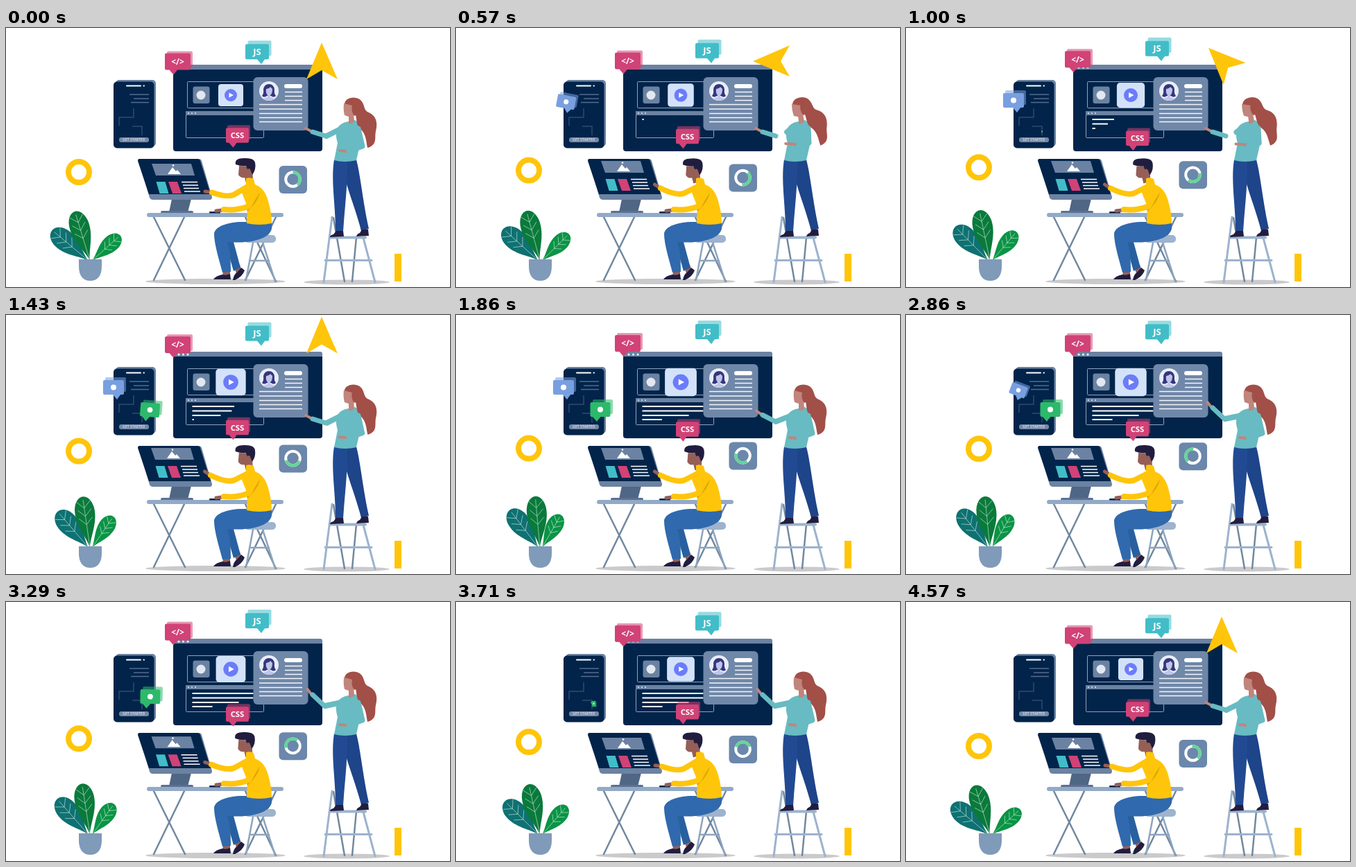
These frames come from a looping animation (640x374 px, 4.64 s). An HTML page:

```html
<!DOCTYPE html>
<html lang="en">
<head>
<meta charset="utf-8">
<title>Design and development</title>
<style>
html,body{margin:0;width:100%;height:100%;overflow:hidden;background:#fff}
svg{display:block;width:100vw;height:100vh}
text{font-family:"Open Sans",sans-serif;font-weight:700;fill:#fff;text-anchor:middle}
.line{fill:none;stroke-linecap:round;stroke-linejoin:round}
.navy{fill:#02244a}.slate{fill:#6b82a2}.teal{fill:#42bdc8}.pink{fill:#d14276}
.sun{fill:#ffc50a}.dark{fill:#211d3f}.brown{fill:#955f57}.skin{fill:#c0857c}
</style>
</head>
<body>
<svg viewBox="0 0 640 374">
  <!-- floor -->
  <ellipse cx="302" cy="366" rx="101" ry="4" fill="#cacacc"/>
  <ellipse cx="491" cy="367" rx="62" ry="3.5" fill="#cacacc"/>
  <rect class="sun" x="560" y="326" width="10" height="40"/>
  <circle id="ring" cx="105" cy="208" r="15" fill="none" stroke="#ffc50a" stroke-width="8"/>

  <!-- large window -->
  <rect class="slate" x="241" y="53" width="215" height="30" rx="3"/>
  <path class="navy" d="M241 60H456V174q0 4-4 4H245q-4 0-4-4Z"/>
  <g fill="#fff"><circle cx="249" cy="57" r="1.5"/><circle cx="255.500" cy="57" r="1.5"/><circle cx="262" cy="57" r="1.5"/></g>
  <g fill="none" stroke="#8fa3bf"><rect x="261.500" y="77.500" width="108" height="38" rx="1"/><rect x="259.500" y="120.500" width="112" height="38" rx="1"/></g>
  <rect class="slate" x="259" y="120" width="113" height="6"/>
  <g fill="#dfe7f2"><circle cx="263" cy="123" r="1"/><circle cx="268" cy="123" r="1"/><circle cx="273" cy="123" r="1"/></g>
  <rect class="slate" x="269.500" y="84.500" width="24" height="24.500" rx="3"/>
  <circle cx="281" cy="97" r="6.500" fill="#e3e8f0"/>
  <g id="play">
    <rect x="-18" y="-16" width="36" height="32" rx="4" fill="#d3e2f8"/>
    <circle r="9" fill="#6b7cfa"/><path d="M-2.500-3.500 4 0-2.500 3.500Z" fill="#fff"/>
  </g>
  <g id="code" class="line" stroke="#fff" stroke-width="2" style="stroke-linecap:butt"></g>
  <rect x="356.500" y="71" width="79" height="77" rx="6" fill="#6f87a8"/>
  <circle cx="379" cy="91" r="14" fill="#e9edf8"/>
  <path d="M369 98q3-4 2-9 1-8 8-8t8 8q-1 5 2 9-3 3-7 0h-6q-4 3-7 0Z" fill="#34377c"/>
  <path d="M375 88q5-1 6-3l3 3q0 7-3 9v3q5 1 6 3-8 4-16 0 1-2 6-3v-3q-3-3-2-9Z" fill="#bfc5e8"/>
  <rect x="401" y="81" width="26" height="6" rx="3" fill="#fff"/>
  <path d="M402 92.500h25M402 98.500h25M402 104.500h25M365 110.500h62M365 117h62M365 123.500h62M365 129.500h62M365 135.500h62" stroke="#f5f7fa" stroke-width="1.600"/>

  <!-- phone -->
  <rect class="slate" x="158" y="75" width="58" height="96" rx="5"/>
  <rect class="navy" x="155" y="77.500" width="58.500" height="96" rx="5"/>
  <path class="line" d="M174 83.500h20M198.500 83.500h.5" stroke="#fff" stroke-width="2"/>
  <path d="M178 96h28M184 102h22M180 107.500h26" stroke="#516b8e" stroke-width="1.600"/>
  <path d="M163 141v-12h21v-13M182 142h14v13" fill="none" stroke="#30496d" stroke-width="1.500"/>
  <rect x="163" y="158" width="43" height="7" rx="3" fill="#7488a6"/>
  <text x="184.500" y="163.300" font-size="4.600" letter-spacing=".3" style="font-weight:600" opacity=".85">GET STARTED</text>

  <!-- progress panel -->
  <g id="panel">
    <rect x="393.500" y="199" width="40.500" height="40" rx="6" fill="#6b87ab"/>
    <circle cx="413.500" cy="218.500" r="10.300" fill="none" stroke="#fff" stroke-width="4"/>
    <circle id="arc" cx="413.500" cy="218.500" r="10.300" fill="none" stroke="#62d695" stroke-width="4" pathLength="360" stroke-dasharray="142 218"/>
  </g>

  <!-- plant -->
  <g id="plant"></g>
  <path d="M105 334h33v10c0 14-6 21-16.500 21S105 358 105 344Z" fill="#809ab9"/>

  <!-- desk and stool -->
  <g class="line" stroke="#71889f" stroke-width="2.500">
    <path d="M213 273 258 364M257 273 213 364M345 273 389 366M389 273 345 364"/>
    <path d="M356 310 346 364M370 310 388 366M351 336h28" stroke="#8da4bf"/>
  </g>
  <rect x="344" y="299" width="45" height="11" rx="5" fill="#9db3ce"/>
  <path d="M239 247h28l-5 19h-27Z" fill="#4f6685"/>
  <rect x="223" y="264" width="47" height="4" rx="2" fill="#5a7193"/>
  <path class="slate" d="M194 189H278q3 0 4 3L297 244q0 4-3 4H212q-4 0-5-3L191 192Z"/>
  <path class="navy" d="M192 189H276q3 0 4 3L295 240H206L190 192q0-3 2-3Z"/>
  <g id="page">
    <path class="slate" d="M210 196h57l5 17H216Z"/>
    <path d="M233 211 240 201 245 207 247 205 252 211Z" fill="#fff"/><circle cx="241" cy="198.500" r="1.300" fill="#fff"/>
    <path class="teal" d="M216.500 222h13l5 17H221.500Z"/><path class="pink" d="M234 222h13l6 17H240Z"/>
    <path d="M253 222.500h23M255 227h22M256 231.500h22M257 236h23" stroke="#fff" stroke-width="1.500"/>
  </g>
  <rect x="203" y="267" width="197" height="6" rx="3" fill="#92aac7"/>
  <rect class="navy" x="293" y="265" width="16" height="2.500" rx="1"/>

  <!-- seated man -->
  <path class="brown" d="M313 350h10v10h-11ZM329 345l8-3 4 12-8 4Z"/>
  <path d="M345 282C326 284 312 296 315 306L328 351 338 346 328 309 365 302Z" fill="#28609f"/>
  <path d="M383 280H345C322 279 301 286 300 297 300 312 307 334 312 353L324 352C324 334 323 320 319 309 340 311 378 309 383 290Z" fill="#3069ad"/>
  <path class="dark" d="M299 363q3-5 13-7 5 2 11-1l1 8ZM327 364q1-8 6-11l6-7 5 4q-3 9-14 14Z"/>
  <g id="manHead">
    <path class="brown" d="M336 199 335 212q3 5 9 4l2 8 10-3-1-21Z"/>
    <path class="dark" d="M331 197q-2-9 12-9 14-1 16 6 2 10-4 18l-3-8q-2-2-4 0l-2-5q-7 1-15-2Z"/>
  </g>
  <path class="sun" d="M346 217q6-2 11 1l2 8q14 5 19 24 5 18 5 32-18 4-36 0l1-24-8-20 6-13Z"/>
  <path d="M366 237Q364 250 348 265L346 260Q358 252 366 237Z" fill="#dba508"/>
  <path class="line" id="manHand" stroke="#955f57" stroke-width="5"/>
  <path class="line" id="manArm" stroke="#ffc50a" stroke-width="8"/>
  <path class="line" d="M303 264 311 263" stroke="#955f57" stroke-width="5"/>
  <path class="line" d="M314 262Q334 264 350 257L360 238" stroke="#ffc50a" stroke-width="8"/>

  <!-- ladder -->
  <g class="line" stroke-width="3">
    <path d="M472 274 488 366M505 302 499 366" stroke="#71889f" stroke-width="2.500"/>
    <path d="M470 273 458 367M515 303 532 367M460 335.500H527" stroke="#9db3ce"/>
    <path d="M467 302.500H518" stroke="#9db3ce" stroke-width="4"/>
  </g>

  <!-- standing woman -->
  <path d="M488 190H505C512 218 514 250 523 290L512 293C504 262 494 238 488 215Z" fill="#1e4489"/>
  <path d="M473 190H492C493 225 488 260 486 294H475C475 255 468 220 473 190Z" fill="#214a92"/>
  <path class="dark" d="M467 302q0-3 5-4l4-5h10l1 8ZM505 301q1-4 5-5l3-5h9l1 9Z"/>
  <path class="line" id="herHand" stroke="#c0857c" stroke-width="4"/>
  <path class="line" id="herFore" stroke="#68bbc2" stroke-width="7"/>
  <path class="line" id="herUpper" stroke="#68bbc2" stroke-width="8"/>
  <path d="M489 136 503 133C512 137 512 152 511 165L505 191Q488 195 473 191L478 166C473 150 477 140 489 136Z" fill="#68bbc2"/>
  <path class="line" id="hipHand" stroke="#c0857c" stroke-width="4"/>
  <g id="herHead">
    <path d="M488 109C490 99 506 98 512 105 518 112 515 119 523 122 534 127 536 137 533 149 531 158 536 169 521 173 519 163 519 153 511 146 503 139 507 129 502 121L499 112Z" fill="#a24f48"/>
    <path class="skin" d="M487 109q-1 10 1 17l6 2v10q5 1 8-3l-1-14 1-9-4-3Z"/>
    <path d="M488 109q7-5 14-1l4 9q-1 10-4 10-5-7-3-15Z" fill="#a24f48"/>
  </g>
  <path class="line" id="hipArm" stroke="#68bbc2" stroke-width="7"/>

  <path id="cursor" class="sun" d="M0-27 23 26 0 13-22 26Z"/>

  <!-- labels -->
  <g id="tag"></g><g id="js"></g><g id="css"></g><g id="blue"></g><g id="green"></g>
</svg>
<script>
const LOOP = 4640, $ = id => document.getElementById(id);
const set = (id, name, value) => $(id).setAttribute(name, value);
const move = (id, x, y, rest = '') => set(id, 'transform', `translate(${x} ${y})${rest}`);
const mix = (a, b, p) => a + (b - a) * p;
const clamp = x => Math.max(0, Math.min(1, x));
const ramp = (t, a, b) => { const p = clamp((t - a) / (b - a)); return p * p * (3 - 2 * p); };
const pulse = (t, a, b, c, d) => ramp(t, a, b) - ramp(t, c, d);
const wave = (t, n) => (1 - Math.cos(2 * Math.PI * n * t / LOOP)) / 2;

// Speech bubble centred on 0,0 with a paler copy behind it
function bubble(id, w, h, color, tail, dx, dy, content) {
  const x = w / 2, y = h / 2;
  const shape = `M${2 - x} ${-y}H${x - 2}q2 0 2 2V${y - 2}q0 2-2 2H${tail + 5}l-5 7-6-7H${2 - x}q-2 0-2-2V${2 - y}q0-2 2-2Z`;
  $(id).innerHTML = `<path d="${shape}" fill="${color}" opacity=".55" transform="translate(${dx} ${dy})"/>` +
    `<path d="${shape}" fill="${color}"/>${content}`;
}
const label = (s, size) => `<text y="${size * .36}" font-size="${size}">${s}</text>`;
const mark = '<circle r="4" fill="#fff"/>';
bubble('tag', 37, 24, '#d14276', -6, 3, -3, label('&lt;/&gt;', 12));
bubble('js', 34, 22, '#42bdc8', 6, 3.5, -5, label('JS', 13));
bubble('css', 33, 21.5, '#d14276', -6, 2, -4, label('CSS', 11.3));
bubble('blue', 30, 21, '#789fe0', 5, 3, -4, mark);
bubble('green', 29, 21, '#2db96b', -5, 3.5, -4, mark);

// Leaves: base x, length, width, resting angle, sway, colour
const leaves = [
  [119, 69, 28, -50, 14, '#0e7172'],
  [121, 75, 27, -17, 13, '#0a7a3b'],
  [124, 55, 22, 48, -20, '#0a9445']
];
leaves.forEach(([, L, w, , , color], i) => {
  let veins = `M0 0V${-.93 * L}`;
  for (let k = .45; k < .8; k += .16) veins += `M${-.36 * w} ${-(k + .13) * L}L0 ${-k * L} ${.36 * w} ${-(k + .13) * L}`;
  const blade = `M0 0C${-.08 * w} ${-.2 * L} ${-.62 * w} ${-.45 * L} ${-.52 * w} ${-.76 * L}` +
    `C${-.38 * w} ${-1.07 * L} ${.38 * w} ${-1.07 * L} ${.52 * w} ${-.76 * L}C${.62 * w} ${-.45 * L} ${.08 * w} ${-.2 * L} 0 0`;
  $('plant').innerHTML += `<g id="leaf${i}"><path d="${blade}" fill="${color}"/>` +
    `<path d="${veins}" fill="none" stroke="#d8eee4" stroke-width=".7" opacity=".8"/></g>`;
});

// Code lines: y, full width, start time, pixels per ms
const lines = [[132, 88, 540, .068], [138.5, 88, 720, .08], [145, 67, 950, .085], [151, 29, 1390, .06]];
$('code').innerHTML = lines.map((_, i) => `<path id="line${i}"/>`).join('');

function badge(id, p, x, y, dx, dy, turn) {
  const q = 1 - p;
  move(id, x + dx * q, y + dy * q, ` rotate(${turn * q}) scale(${p})`);
}

function draw() {
  const t = performance.now() % LOOP, s = wave(t, 1), nod = wave(t, 3);
  move('ring', 0, -17 * s);
  move('panel', 0, -17 * s);
  set('arc', 'transform', `rotate(${360 * t / LOOP - 90} 413.5 218.5)`);
  move('play', 324, 97, ` scale(${1 + .3 * s})`);
  move('tag', 247.5, 48.6 - 8.3 * s);
  move('js', 362, 34.3 - 11.5 * s);
  move('css', 333.5, 155 + 11 * s);
  leaves.forEach(([x, , , angle, sway], i) => move('leaf' + i, x, 336, ` rotate(${angle + sway * s})`));

  const erase = 1 - ramp(t, 3850, 4350);
  lines.forEach(([y, w, start, speed], i) => {
    const len = Math.max(0, Math.min(w, (t - start) * speed)) * erase;
    set('line' + i, 'd', len ? `M268.500 ${y}h${len}` : '');
  });

  badge('blue', pulse(t, 150, 680, 2680, 3300), 155, 104.5, 34, 20, 100);
  badge('green', pulse(t, 900, 1500, 3250, 3950), 208, 136.5, -13, 14, 120);

  const m = pulse(t, 70, 540, 2950, 3600);
  move('page', -m, -4 * m);
  move('manHead', -4.5 * nod, .5 * nod);
  const wx = mix(296, 294, m), wy = mix(237, 231, m);
  set('manHand', 'd', `M${mix(287, 286.5, m)} ${mix(236, 226, m)}L${wx} ${wy}`);
  set('manArm', 'd', `M${wx + 1} ${wy + .5}Q${mix(318, 316, m)} ${mix(245, 242, m)} 328 ${mix(241, 239, m)}L350 228`);

  const turn = t < LOOP / 3 ? nod : 0, up = pulse(t, 1600, 2250, 3750, 4450);
  set('herHead', 'transform', `rotate(${-8 * turn} 495 135)`);
  const sy = mix(149, 133, up), ex = mix(461, 459, up), ey = mix(156, 150, up);
  set('herHand', 'd', `M${mix(432, 434.5, up)} ${mix(145, 126, up)}L440 ${sy}`);
  set('herFore', 'd', `M442 ${sy + 1}L${ex} ${ey}`);
  set('herUpper', 'd', `M${mix(ex + 1, 480, turn)} ${mix(ey, 149, turn)}L484 145`);
  set('hipHand', 'd', `M${mix(481, 474, turn)} ${mix(177, 165, turn)}L491 ${mix(178, 166, turn)}`);
  set('hipArm', 'd', `M508 145L${mix(514, 508, turn)} ${mix(171, 165, turn)}L494 ${mix(177.5, 167, turn)}`);

  const late = t > 3000, lift = late ? 0 : ramp(t, 1210, 1970);
  const size = late ? ramp(t, 3950, 4400) : t < 2000 ? 1 : 0;
  move('cursor', 455, 48 - 90 * lift, ` rotate(${-90 * pulse(t, 70, 540, 750, 1250)}) scale(${size})`);
  requestAnimationFrame(draw);
}
draw();
</script>
</body>
</html>
```
